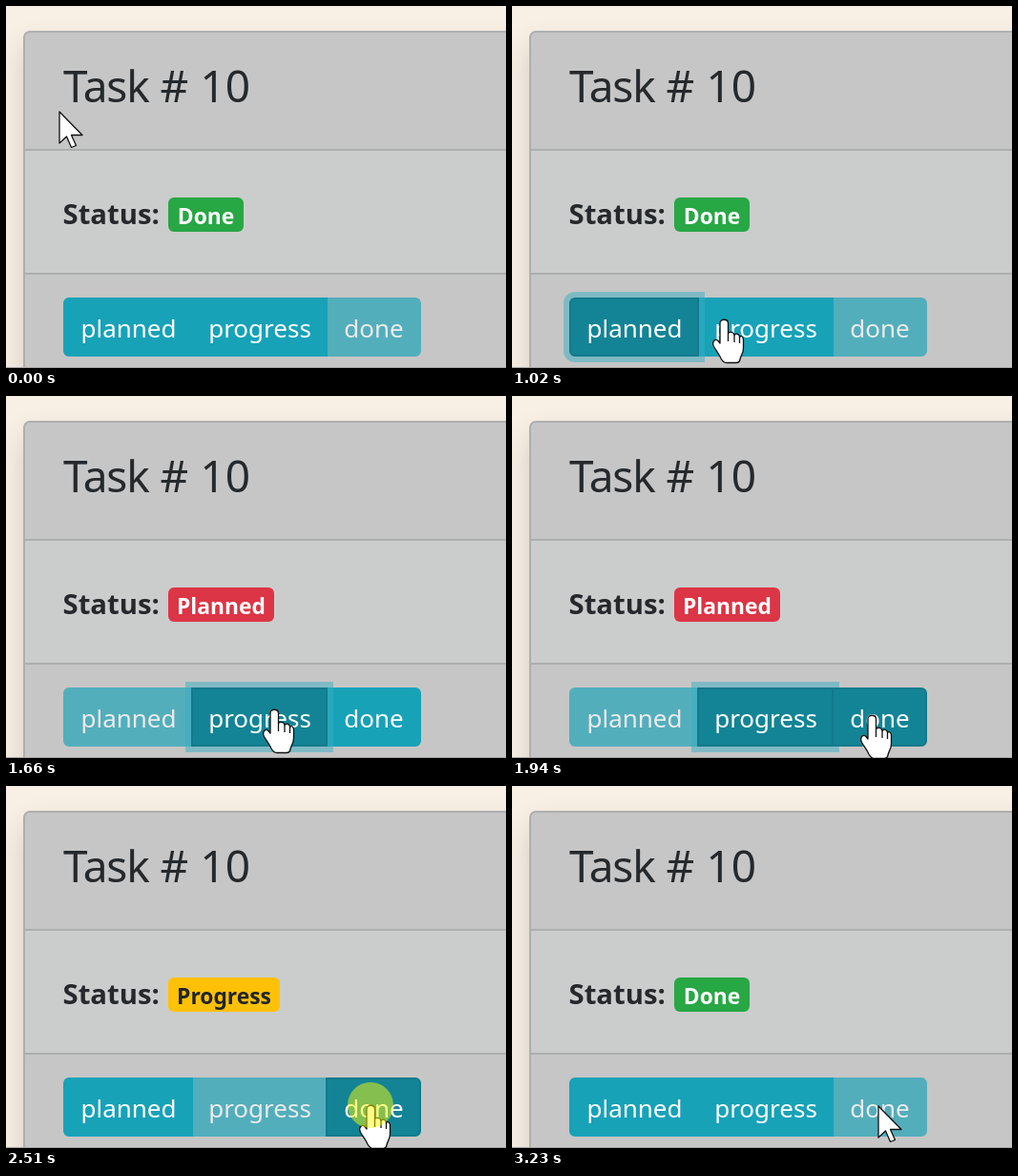
Write an HTML page that moves like this. It is 524 by 380 pixels and loops after 3.8 s.

```html
<!DOCTYPE html>
<html lang="en">
<head>
<meta charset="utf-8">
<title>Task status</title>
<style>
html, body { margin: 0; width: 100%; height: 100%; overflow: hidden; }
body { position: relative; background: #f8efe5; font-family: "Noto Sans", "Open Sans", sans-serif; }
body * { box-sizing: border-box; }
.card {
  position: absolute; left: 18px; top: 26px; width: 700px; height: 500px;
  border: 2px solid #adafae; border-radius: 7px; background: #c6c6c6;
  box-shadow: 0 16px 32px rgba(0, 0, 0, .15);
}
.body {
  position: absolute; left: 0; right: 0; top: 122px; height: 132px;
  border: solid #adafae; border-width: 2px 0; background: #cbcdcc;
}
.badge {
  position: absolute; left: 170px; top: 201px; height: 36px; border-radius: 6px;
  font-size: 22.8px; font-weight: 700; line-height: 40px; text-align: center; color: #fff;
}
.btn {
  position: absolute; top: 306px; height: 62px; border: 2px solid #17a2b8; background: #17a2b8;
  color: #fff; font-size: 26px; line-height: 60px; text-align: center; text-indent: 1px; white-space: nowrap;
}
.btn.hot { background: #138496; border-color: #117a8b; z-index: 1; }
.btn.off { opacity: .65; }
#planned { left: 60px; width: 136px; border-radius: 6px 0 0 6px; }
#progress { left: 194px; width: 143px; }
#done { left: 335px; width: 100px; border-radius: 0 6px 6px 0; }
.edge { position: absolute; left: 0; right: 0; top: 379px; height: 1px; background: #a9a8a6; z-index: 2; }
svg { position: absolute; left: 0; top: 0; z-index: 3; }
#arrow, #hand { fill: #fff; stroke: #111; stroke-width: 1.3; stroke-linejoin: round; }
</style>
</head>
<body>
<div class="card"><div class="body"></div></div>
<div class="badge" id="badge"></div>
<div class="btn" id="planned">planned</div>
<div class="btn" id="progress">progress</div>
<div class="btn" id="done">done</div>
<div class="edge"></div>
<svg width="524" height="380" viewBox="0 0 524 380">
  <g fill="#26292c">
    <text y="101.3" font-size="46"><tspan x="60" letter-spacing="-1.2">Task</tspan><tspan x="161.5">#</tspan><tspan x="203.5">10</tspan></text>
    <text x="59.5" y="229" font-size="29.3" font-weight="700">Status:</text>
  </g>
  <path id="arrow" d="M0 0V33L7.5 26L12.5 37.5L17.5 35.5L12.5 24.5H24Z"/>
  <g id="hand">
    <path d="M-4 4C-4-1 4.5-1 4.5 4V14.5C6 12.5 10.5 13 11 16.5C13 14 16.5 15.5 16.5 18.5C18.5 16.5 20.5 18.5 20.5 21.5V30C20.5 36 17.5 38 17 42C16.5 44.5 15.5 45.5 13 45.5H3C0 45.5-1.5 44-3 41C-5 36-8 33-10.5 28.5C-13 23.5-9 19.5-6 22.5L-4 25Z"/>
    <path d="M4.5 14.5V23M11 16.5V24M16.5 18.5V25" fill="none"/>
  </g>
  <circle id="press" r="24" fill="#ff0" fill-opacity=".48"/>
</svg>
<script>
const LOOP = 3800;
const $ = id => document.getElementById(id);
const names = ['planned', 'progress', 'done'];

const badges = {
  planned: ['Planned', 111, '#dc3545', '#fff'],
  progress: ['Progress', 117, '#ffc107', '#212529'],
  done: ['Done', 79, '#28a745', '#fff']
};

// Each step changes only what it names; the rest carries over.
const steps = [
  { t: 0, at: [56, 111], cursor: 'arrow', status: 'done', hover: '', focus: '', ring: 0, press: false },
  { t: 100, at: [59, 119] },
  { t: 190, at: [75, 154] },
  { t: 280, at: [90, 218] },
  { t: 370, at: [104, 283] },
  { t: 460, at: [116.5, 329], cursor: 'hand', hover: 'planned' },
  { t: 560, at: [118, 332], focus: 'planned', ring: 5, press: true },
  { t: 640, ring: 6, press: false },
  { t: 820, at: [138, 332] },
  { t: 920, at: [180, 331] },
  { t: 1020, at: [222, 329] },
  { t: 1100, at: [243, 328], status: 'planned', hover: 'progress', focus: '', ring: 0 },
  { t: 1200, at: [262, 327] },
  { t: 1280, at: [281, 329] },
  { t: 1480, press: true },
  { t: 1580, focus: 'progress', ring: 5 },
  { t: 1660, ring: 6, press: false },
  { t: 1760, at: [309, 332] },
  { t: 1840, at: [350, 335], hover: 'done' },
  { t: 1940, at: [377, 335] },
  { t: 2220, status: 'progress', focus: '', ring: 0 },
  { t: 2320, at: [379, 335] },
  { t: 2420, at: [381, 335] },
  { t: 2510, at: [382, 335], press: true },
  { t: 2590, focus: 'done', ring: 5 },
  { t: 2690, ring: 6, press: false },
  { t: 2770, at: [383, 335] },
  { t: 2870, at: [383, 336] },
  { t: 2950, at: [384, 336] },
  { t: 3230, cursor: 'arrow', status: 'done', hover: '', focus: '', ring: 0 }
];
for (let i = 1; i < steps.length; i++) steps[i] = { ...steps[i - 1], ...steps[i] };

function draw(s) {
  const [label, width, back, ink] = badges[s.status];
  const badge = $('badge');
  badge.textContent = label;
  badge.style.width = width + 'px';
  badge.style.background = back;
  badge.style.color = ink;

  for (const name of names) {
    const btn = $(name);
    btn.classList.toggle('off', name === s.status);
    btn.classList.toggle('hot', name === s.hover || name === s.focus);
    btn.style.boxShadow = name === s.focus ? `0 0 0 ${s.ring}px rgba(58,176,195,.5)` : 'none';
  }

  const place = `translate(${s.at[0]} ${s.at[1]})`;
  const visible = { arrow: s.cursor === 'arrow', hand: s.cursor === 'hand', press: s.press };
  for (const id in visible) {
    $(id).style.display = visible[id] ? '' : 'none';
    $(id).setAttribute('transform', place);
  }
}

const start = performance.now();
let shown;
function tick() {
  const t = (performance.now() - start) % LOOP;
  const step = steps.findLast(s => s.t <= t);
  if (step !== shown) draw(shown = step);
  requestAnimationFrame(tick);
}
tick();
</script>
</body>
</html>
```
